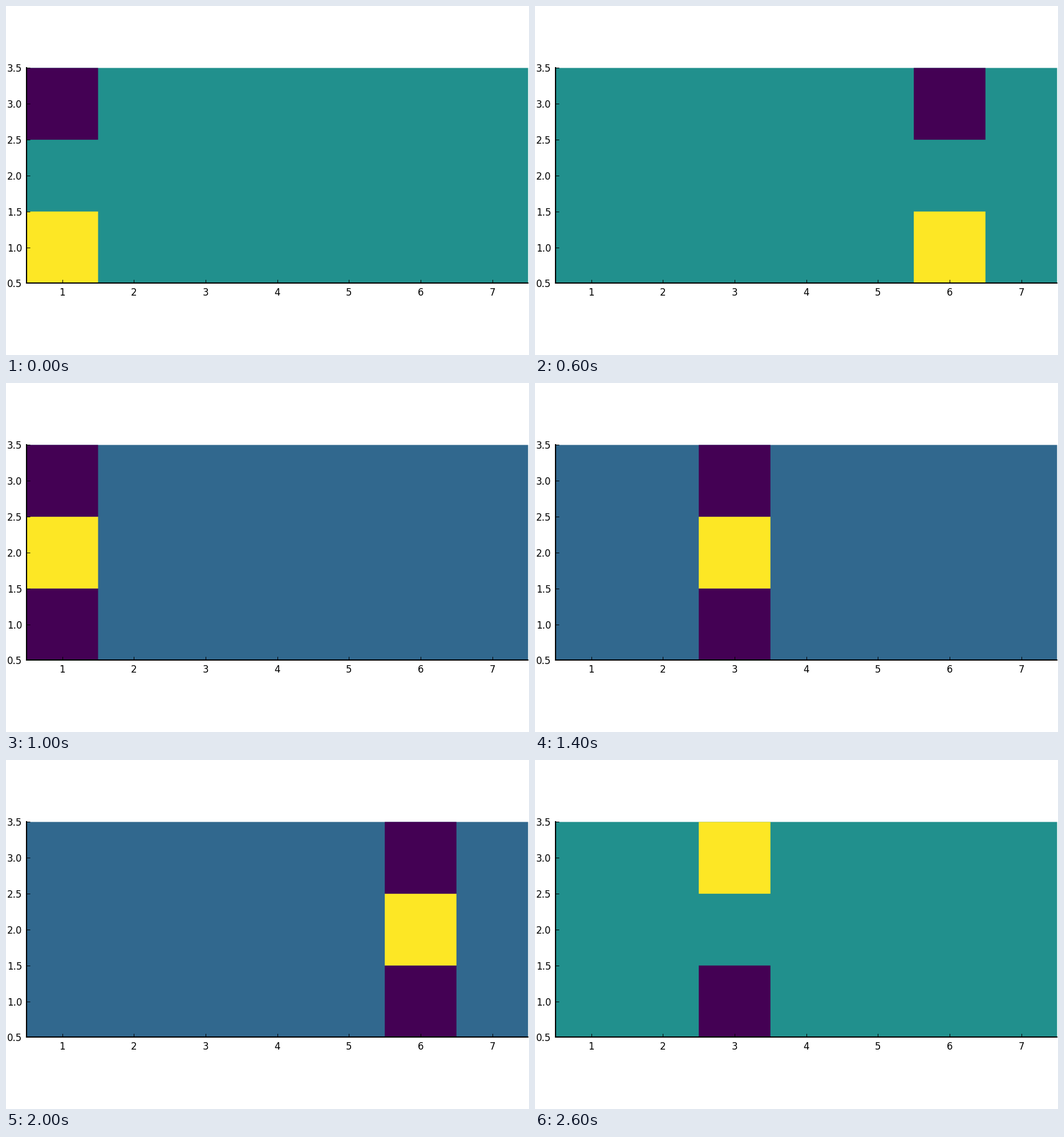
A matplotlib script that plays this animation: 917 px wide and 611 px high, repeating every 2.8 s.

```python
import matplotlib.pyplot as plt
from matplotlib.animation import FuncAnimation
from matplotlib.patches import Rectangle

W, H, DPI = 917, 611, 128
LEFT, RIGHT, TOP, BOTTOM = 35.8, 915.45, 108.45, 485.45
COLS, ROWS = 7, 3

# Cell values of the active column from bottom to top, and the resting value
FALLING = ((1, 0.498, 0), 0.498)
RISING = ((0, 0.498, 1), 0.498)
PEAK = ((0, 1, 0), 1 / 3)

STEPS = (
    [(col, FALLING) for col in (1, 4, 5, 6, 7)]
    + [(col, PEAK) for col in range(1, COLS + 1)]
    + [(col, RISING) for col in (2, 3)]
)

cmap = plt.get_cmap("viridis")


def px(size):
    """Convert pixels to points."""
    return size * 72 / DPI


plt.rcParams["font.family"] = "DejaVu Sans"
fig = plt.figure(figsize=(W / DPI, H / DPI), dpi=DPI, facecolor="white")
ax = fig.add_axes(
    [LEFT / W, 1 - BOTTOM / H, (RIGHT - LEFT) / W, (BOTTOM - TOP) / H]
)
ax.set_xlim(0.5, COLS + 0.5)
ax.set_ylim(0.5, ROWS + 0.5)
ax.patch.set_visible(False)

ax.set_xticks(range(1, COLS + 1))
y_ticks = [0.5 + 0.5 * i for i in range(2 * ROWS + 1)]
ax.set_yticks(y_ticks, [f"{y:.1f}" for y in y_ticks])
ax.tick_params(
    direction="in", length=px(5.6), width=px(1.04), pad=px(7.3),
    labelsize=px(16.67), color="black",
)
for side in ("top", "right"):
    ax.spines[side].set_visible(False)
for side in ("left", "bottom"):
    ax.spines[side].set_linewidth(px(2.08))


def add_rect(x, y, w, h):
    rect = Rectangle((x, y), w, h, lw=0, snap=False, clip_on=False)
    return ax.add_patch(rect)


field = add_rect(0.5, 0.5, COLS, ROWS)
cells = [add_rect(0.5, row + 0.5, 1, 1) for row in range(ROWS)]


def update(i):
    col, (values, rest) = STEPS[i % len(STEPS)]
    field.set_facecolor(cmap(rest))
    for cell, value in zip(cells, values):
        cell.set_x(col - 0.5)
        cell.set_facecolor(cmap(float(value)))
        cell.set_visible(value != rest)
    return [field, *cells]


anim = FuncAnimation(
    fig, update, frames=len(STEPS), interval=200, repeat=True, repeat_delay=0
)
plt.show()
```
